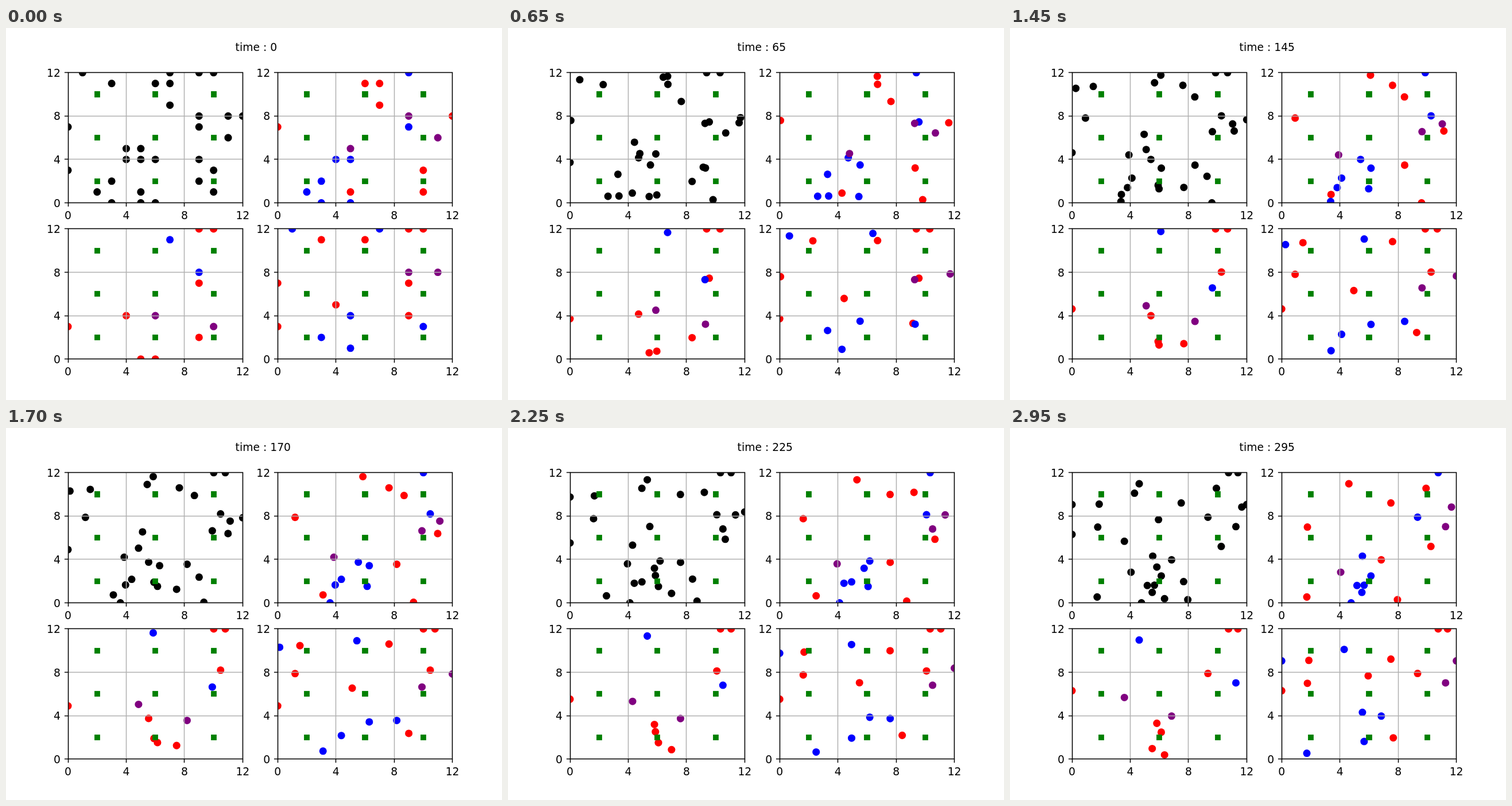
Recreate the animation shown at these times as an HTML page with a canvas. Size 864 px wide and 648 px high, loop 3 s.

```html
<!DOCTYPE html>
<html lang="en">
<head>
<meta charset="utf-8">
<title>Walkers</title>
<style>
html, body { margin: 0; height: 100%; overflow: hidden; background: #fff; }
canvas { display: block; }
</style>
</head>
<body>
<canvas id="stage" width="864" height="648"></canvas>
<script>
const ctx = document.getElementById("stage").getContext("2d");
const SIZE = 12, SPEED = 0.0112;
const LEFT = 108, TOP = 77.76, W = 304.36, H = 226.8, GAP = 1.2;
const LOOP = 3000, FRAME = 50, TICKS = [0, 4, 8, 12];
const FILLS = { k: "black", r: "red", b: "blue", p: "purple" };
const walkers = [];

// colors: a letter for each of panels 2 to 4; turns: time, new heading, ...
function walk(colors, x, y, heading, ...turns) {
  walkers.push({ colors: "k" + colors, x, y, path: [0, heading, ...turns] });
}

walk("--b", 1, 12, -117);
walk("--r", 3, 11, -172, 140, -76);
walk("r-r", 6, 11, -6, 150, -96);
walk("--b", 7, 12, -145);
walk("rb-", 7, 11, 114, 100, -152);
walk("brr", 9, 12, 58);
walk("-rr", 10, 12, 65);
walk("r--", 7, 9, 28);
walk("pbp", 9, 8, -68, 140, 16);
walk("brr", 9, 7, 39, 180, -163);
walk("--p", 11, 8, -12, 150, 60);
walk("r--", 12, 8, -122);
walk("p--", 11, 6, 156, 40, 68);
walk("r-r", 0, 7, 120, 60, 14, 205, -79);
walk("-rr", 0, 3, 90);
walk("--r", 4, 5, 54);
walk("p--", 5, 5, -77, 38, -172, 152, -82);
walk("br-", 4, 4, 12, 118, -65);
walk("b-b", 5, 4, -44, 126, 56, 196, 145);
walk("-p-", 6, 4, 63, 36, 153);
walk("--r", 9, 4, -78, 140, -163);
walk("rpb", 10, 3, 163);
walk("-r-", 9, 2, 153, 35, -142);
walk("r--", 10, 1, -104, 145, 170);
walk("b-b", 3, 2, 68, 62, -23);
walk("b--", 2, 1, -33);
walk("r-b", 5, 1, -172);
walk("b--", 3, 0, 60, 195, -15);
walk("br-", 5, 0, 53, 195, -136);
walk("-r-", 6, 0, 93);

const clamp = v => Math.min(SIZE, Math.max(0, v));
const snap = v => Math.floor(v) + 0.5;

// Constant speed along each heading; walls stop only the blocked direction.
function place({ x, y, path }, t) {
  for (let i = 0; i < path.length && path[i] < t; i += 2) {
    const end = Math.min(t, path[i + 2] ?? t);
    const dist = (end - path[i]) * SPEED, angle = path[i + 1] * Math.PI / 180;
    x = clamp(x + dist * Math.cos(angle));
    y = clamp(y + dist * Math.sin(angle));
  }
  return [x, y];
}

function line(x0, y0, x1, y1, color) {
  ctx.strokeStyle = color;
  ctx.beginPath();
  ctx.moveTo(x0, y0);
  ctx.lineTo(x1, y1);
  ctx.stroke();
}

function text(str, x, y, align) {
  ctx.fillStyle = "#000";
  ctx.textAlign = align;
  ctx.fillText(str, x, Math.round(y));
}

function square(x, y) {
  const half = 3.63, edge = 1.41;
  const x0 = snap(x - half) - edge, y0 = snap(y - half) - edge;
  ctx.fillStyle = "green";
  ctx.fillRect(x0, y0, snap(x + half) + edge - x0, snap(y + half) + edge - y0);
}

function drawPanel(panel, t) {
  const left = LEFT + panel % 2 * W * GAP;
  const bottom = TOP + H + (panel >> 1) * H * GAP;
  const px = v => left + v * W / SIZE, py = v => bottom - v * H / SIZE;
  const x0 = snap(px(0)), x1 = snap(px(SIZE)), y0 = snap(py(0)), y1 = snap(py(SIZE));

  ctx.save();
  ctx.beginPath();
  ctx.rect(x0, y1, x1 - x0, y0 - y1);
  ctx.clip();
  for (const key in FILLS) {
    ctx.fillStyle = FILLS[key];
    for (const w of walkers.filter(w => w.colors[panel] === key)) {
      const [x, y] = place(w, t);
      ctx.beginPath();
      ctx.arc(px(x), py(y), 6.54, 0, 7);
      ctx.fill();
    }
  }
  for (let x = 2; x < SIZE; x += 4)
    for (let y = 2; y < SIZE; y += 4) square(px(x), py(y));
  for (const v of TICKS) {
    line(snap(px(v)), y0, snap(px(v)), y1, "#b0b0b0");
    line(x0, snap(py(v)), x1, snap(py(v)), "#b0b0b0");
  }
  ctx.restore();

  for (const v of TICKS) {
    line(snap(px(v)), y0, snap(px(v)), y0 + 6.56, "#000");
    line(x0, snap(py(v)), x0 - 6.56, snap(py(v)), "#000");
    text(v, px(v), bottom + 28, "center");
    text(v, left - 13.1, py(v) + 7, "right");
  }
  ctx.strokeRect(x0, y1, x1 - x0, y0 - y1);
}

function draw(now) {
  const t = Math.floor(now % LOOP / FRAME) * 5;
  ctx.fillStyle = "#fff";
  ctx.fillRect(0, 0, 864, 648);
  ctx.font = '18.75px "DejaVu Sans", sans-serif';
  ctx.lineWidth = 1.5;
  text("time : " + t, 399.6, 40, "left");
  for (let panel = 0; panel < 4; panel++) drawPanel(panel, t);
}

const start = performance.now();
function tick() {
  draw(performance.now() - start);
  requestAnimationFrame(tick);
}
tick();
</script>
</body>
</html>
```
